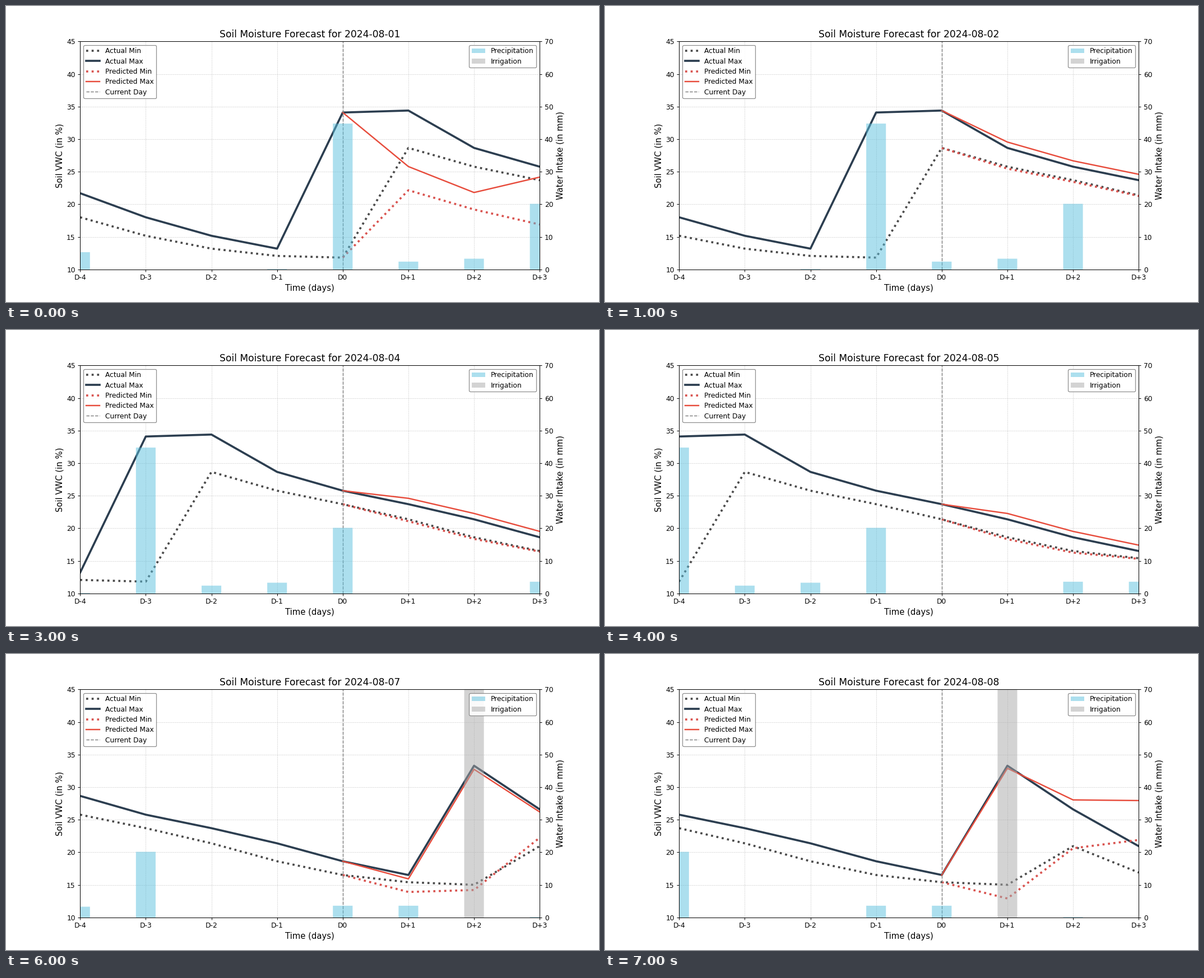
Animation, 1058 px wide and 529 px high, one loop 8 s. Source, as a matplotlib script:

```python
import numpy as np
import matplotlib.pyplot as plt
from matplotlib.animation import FuncAnimation

plt.rcParams["font.family"] = "DejaVu Sans"

DAYS = np.arange(-4, 4)
LEAD = np.linspace(0, 1, 3)
BAR_WIDTH = 0.3
IRRIGATION_DAY = 12

# Amounts in mm on the days with rain, and moisture peaks on wet days.
RAIN = {0: 5.3, 3: 0.15, 4: 44.8, 5: 2.4, 6: 3.3, 7: 20.15,
        10: 3.6, 11: 3.6, 13: 0.15}
WET_PEAKS = {4: 34.1, 5: 34.4, 12: 33.3, 13: 26.6}

# Forecast error on the first and last lead day: max, then min.
TYPICAL_ERROR = (0.9, 0.9, -0.3, -0.1)
FORECAST_ERROR = {
    0: (-8.6, -1.6, -6.5, -6.8),
    2: (-0.3, -0.8, -2.8, -1.6),
    5: (1.5, -1.2, 0.9, 0.0),
    6: (-0.6, -0.4, -1.5, 1.3),
    7: (-0.4, 7.0, -2.1, 5.0),
}


def drying(day, floor, rate, span):
    """Moisture that levels out at the floor after `span` days."""
    return floor + rate * (span - day) ** 2


def simulate():
    """Daily minimum and maximum over three dry spells."""
    first, second, third = np.arange(5), np.arange(8), np.arange(2)
    slow_phase = 1.9 * np.exp(-(second - 2.6) ** 2 / 2.9)
    low = np.concatenate([
        drying(first, 11.8, 0.43, 3.8),
        drying(second, 15.0, 0.26, 7.2) + slow_phase,
        drying(third, 9.7, 0.45, 5.0),
    ])
    # A day starts where the previous one ended, unless water arrives.
    high = np.append(drying(-1, 11.8, 0.43, 3.8), low[:-1])
    for day, peak in WET_PEAKS.items():
        high[day] = peak
    return low, high


def forecast(actual, today, first, last):
    error = first + (last - first) * LEAD ** 2
    return actual[today:today + 4] + np.append(0, error)


low, high = simulate()
fig, ax = plt.subplots(figsize=(12, 6), dpi=88.16667)
water = ax.twinx()


def series(label, color, style, width):
    return ax.plot([], [], style, color=color, lw=width, label=label)[0]


def bars(label, color):
    return water.bar(DAYS, np.zeros(len(DAYS)), BAR_WIDTH, color=color,
                     alpha=0.5, label=label, snap=False)


actual_min = series("Actual Min", "#4a4a4a", ":", 3)
actual_max = series("Actual Max", "#2c3e50", "-", 3)
predicted_min = series("Predicted Min", "#d9534f", ":", 3)
predicted_max = series("Predicted Max", "#e74c3c", "-", 2)
ax.axvline(0, color="gray", ls="--", lw=1.2, label="Current Day")
rain_bars = bars("Precipitation", "#5bc0de")
irrigation_bars = bars("Irrigation", "darkgray")

ax.set(xlim=(-4, 3), ylim=(10, 45))
ax.set_xticks(DAYS, [f"D{d:+d}" if d else "D0" for d in DAYS])
ax.set_xlabel("Time (days)", fontsize=12)
ax.set_ylabel("Soil VWC (in %)", fontsize=12)
ax.grid(True, ls="--", lw=0.5, alpha=0.7)
water.set_ylim(0, 70)
water.set_ylabel("Water Intake (in mm)", fontsize=12)
title = ax.set_title("", fontsize=14)
for axes, corner in ((ax, "upper left"), (water, "upper right")):
    axes.legend(loc=corner, fontsize=10, edgecolor="gray", framealpha=0.9,
                labelspacing=0.44, borderpad=0.37)


def update(step):
    today = step + 4
    window = slice(step, step + len(DAYS))
    errors = FORECAST_ERROR.get(step, TYPICAL_ERROR)
    actual_min.set_data(DAYS, low[window])
    actual_max.set_data(DAYS, high[window])
    predicted_max.set_data(DAYS[4:], forecast(high, today, *errors[:2]))
    predicted_min.set_data(DAYS[4:], forecast(low, today, *errors[2:]))
    for day, (rain, irrigation) in enumerate(
            zip(rain_bars, irrigation_bars), step):
        rain.set_height(RAIN.get(day, 0))
        irrigation.set_height(100 if day == IRRIGATION_DAY else 0)
    title.set_text(f"Soil Moisture Forecast for 2024-08-{step + 1:02d}")
    return []


animation = FuncAnimation(fig, update, frames=8, interval=1000,
                          repeat=True, repeat_delay=0, blit=False)
plt.show()
```
